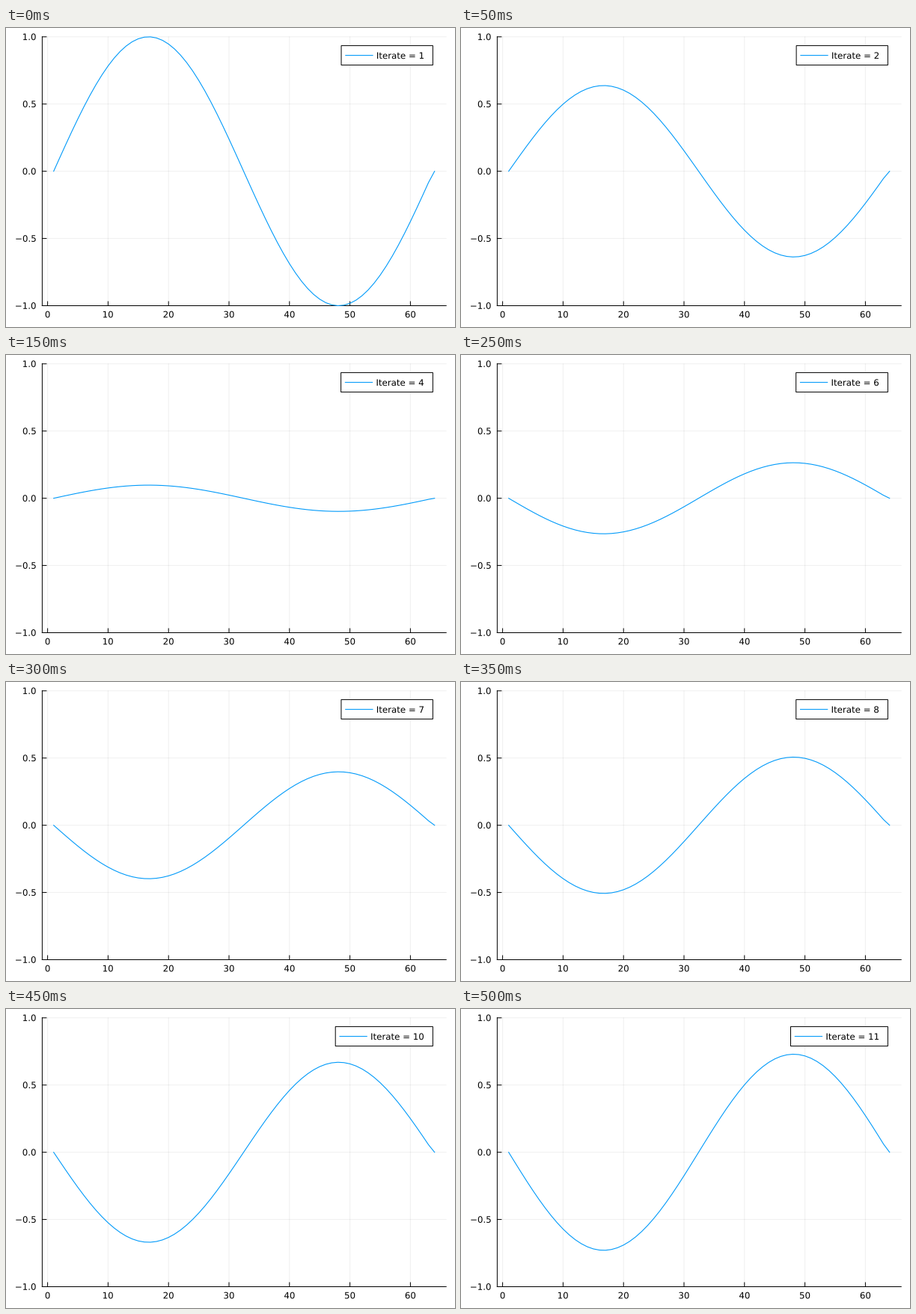
A matplotlib script for the animation above (550 ms loop, 600 by 400 pixels).

```python
import numpy as np
import matplotlib.pyplot as plt
from matplotlib.animation import FuncAnimation
from matplotlib.patches import PathPatch, Rectangle
from matplotlib.textpath import TextPath
from matplotlib.transforms import Affine2D

plt.rcParams["font.family"] = "DejaVu Sans"

W, H, DPI = 600, 400, 100
PX = 72 / DPI  # one pixel in points
BLUE = "#009AFA"
LEFT, RIGHT, TOP, BOTTOM = 48.4, 588.2, 11.8, 371.5
FONT_SIZE = 11.8
TICK = 5.5
FRAMES = 11
DECAY = 0.2
CAPTION_RIGHT, CAPTION_BASE = 558, 41.1

fig = plt.figure(figsize=(W / DPI, H / DPI), dpi=DPI, facecolor="white")
ax = fig.add_axes([0, 0, 1, 1])
ax.set(xlim=(0, W), ylim=(H, 0))
ax.axis("off")


def to_x(v):
    return 55.6 + 8.08 * v


def to_y(v):
    return (TOP + BOTTOM - (BOTTOM - TOP) * v) / 2


def line(xs, ys, color="black", width=1.0, **kw):
    return ax.plot(xs, ys, color=color, lw=width * PX, clip_on=False,
                   snap=False, **kw)[0]


def text_outline(s, x, baseline, align):
    """Outline of s with its ink aligned at x; align is 0.5 (centre) or 1 (right)."""
    path = TextPath((0, 0), s, size=FONT_SIZE)
    box = path.get_extents()
    dx = x - box.x0 - align * box.width
    placed = Affine2D().scale(1, -1).translate(dx, baseline).transform_path(path)
    return placed, box.x0 + dx


def label(s, x, baseline, align, z=3):
    path, _ = text_outline(s, x, baseline, align)
    return ax.add_patch(PathPatch(path, fc="black", lw=0, snap=False, zorder=z))


# Grid, ticks and tick labels
for v in range(0, 61, 10):
    x = to_x(v)
    line([x, x], [TOP, BOTTOM], alpha=0.06, zorder=1)
    line([x, x], [BOTTOM, BOTTOM - TICK], zorder=2)
    label(str(v), x, 387.4, 0.5)

for v in (-1, -0.5, 0, 0.5, 1):
    y = to_y(v)
    line([LEFT, RIGHT], [y, y], alpha=0.06, zorder=1)
    line([LEFT, LEFT + TICK], [y, y], zorder=2)
    label(f"{v:.1f}".replace("-", "\u2212"), 39.7, y + 4.3, 1)

line([LEFT, LEFT], [TOP, BOTTOM], zorder=2)
line([LEFT, RIGHT], [BOTTOM, BOTTOM], zorder=2)

# Sine sampled every 0.1, closed by a zero at the right end
wave = np.append(np.sin(0.1 * np.arange(63)), 0)
curve = line(to_x(np.arange(1, 65)), to_y(wave), BLUE, 1.1, zorder=4)

# Legend
frame_box = ax.add_patch(Rectangle((448, 23.6), 122.4, 26, fc="white",
                                   ec="black", lw=PX, snap=False, zorder=5))
key = line([454, 490], [36.6, 36.6], BLUE, 1.1, zorder=6)
caption = label("Iterate = 1", CAPTION_RIGHT, CAPTION_BASE, 1, z=6)


def update(i):
    amplitude = 2 * np.exp(-DECAY * i) - 1
    curve.set_ydata(to_y(amplitude * wave))
    path, ink_left = text_outline(f"Iterate = {i + 1}", CAPTION_RIGHT,
                                  CAPTION_BASE, 1)
    caption.set_path(path)
    box_left = ink_left - 48
    frame_box.set_x(box_left)
    frame_box.set_width(570.4 - box_left)
    key.set_xdata([box_left + 5.8, box_left + 42])
    return curve, frame_box, key, caption


anim = FuncAnimation(fig, update, frames=FRAMES, interval=50,
                     repeat=True, repeat_delay=0, blit=False)
plt.show()
```
